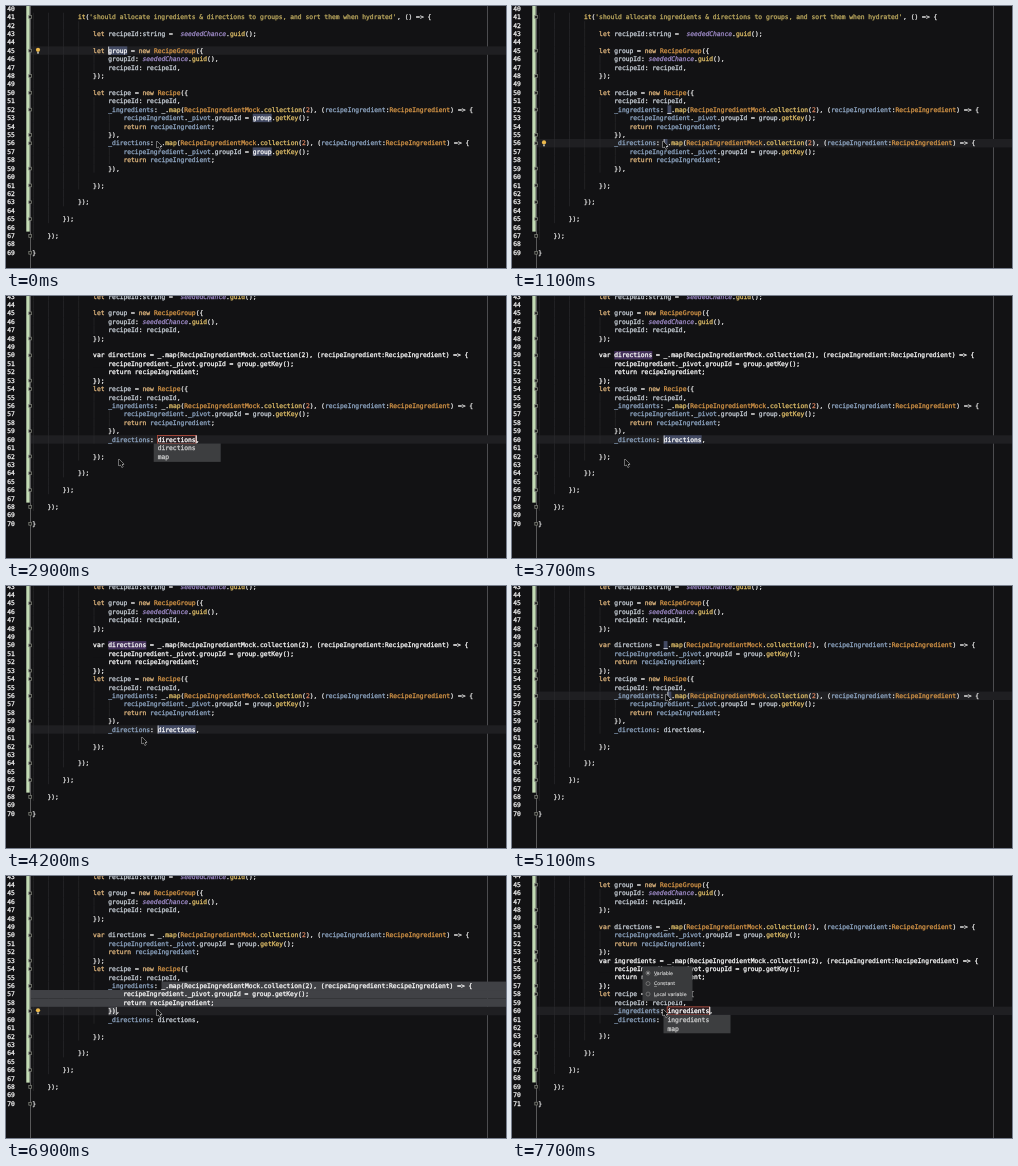
Recreate the animation shown at these times as an HTML page with a canvas. Size 500 px wide and 262 px high, loop 8000 ms.

```html
<!DOCTYPE html>
<html>
<head>
<meta charset="utf-8">
<style>
  html, body { margin: 0; width: 100%; height: 100%; overflow: hidden; background: #121214; }
  canvas { display: block; }
</style>
</head>
<body>
<canvas id="stage" width="500" height="262"></canvas>
<script>
const ctx = document.getElementById('stage').getContext('2d');
const CHAR = 3.8, ROW = 8.42, LEFT = 26.3, FIRST = 41, LOOP = 8000;
const MONO = '6.31px "DejaVu Sans Mono", monospace';
const SANS = '"DejaVu Sans", sans-serif';
const BG = '#121214', SELECTION = '#404145', READ_MARK = '#434a63', WRITE_MARK = '#43305a';

// Code in its three states
const at = (col, text) => ' '.repeat(col) + text;
const mapCall = (col, head, end) => [
  at(col, head + '_.map(RecipeIngredientMock.collection(2), (recipeIngredient:RecipeIngredient) => {'),
  at(col + 4, 'recipeIngredient._pivot.groupId = group.getKey();'),
  at(col + 4, 'return recipeIngredient;'),
  at(col, end)
];
const intro = [
  at(12, "it('should allocate ingredients & directions to groups, and sort them when hydrated', () => {"), '',
  at(16, 'let recipeId:string =  seededChance.guid();'), '',
  at(16, 'let group = new RecipeGroup({'),
  at(20, 'groupId: seededChance.guid(),'),
  at(20, 'recipeId: recipeId,'),
  at(16, '});'), ''
];
const recipe = [at(16, 'let recipe = new Recipe({'), at(20, 'recipeId: recipeId,')];
const outro = ['', at(16, '});'), '', at(12, '});'), '', at(8, '});'), '', at(4, '});'), '', '}'];
const inlineIngredients = mapCall(20, '_ingredients: ', '}),');
const directionsVar = mapCall(16, 'var directions = ', '});');
const directionsUse = at(20, '_directions: directions,');
const docs = [
  { scroll: 0, lines: [...intro, ...recipe, ...inlineIngredients, ...mapCall(20, '_directions: ', '}),'), ...outro] },
  { scroll: 27.4, lines: [...intro, ...directionsVar, ...recipe, ...inlineIngredients, directionsUse, ...outro] },
  { scroll: 36, lines: [...intro, ...directionsVar, ...mapCall(16, 'var ingredients = ', '});'), ...recipe,
    at(20, '_ingredients: ingredients,'), directionsUse, ...outro] }
];

const syntax = [
  [/^'[^']*'/, '#b7a45c'],
  [/^(let|var|new|return)\b/, '#d8b07a'],
  [/^seededChance/, '#9a87c2'],
  [/^[A-Z]\w*/, '#cf9145'],
  [/^\w+(?=\()/, '#d8b865'],
  [/^\d+/, '#c97b5a'],
  [/^(recipeIngredient|_ingredients|_directions|_pivot)\b/, '#8ba2be'],
  [/^\w+/, '#c3cad2'],
  [/^\s+/, BG],
  [/^./, '#dcdcdc']
];

let doc;
const xOf = col => LEFT + col * CHAR;
const yOf = n => 10.9 + (n - FIRST) * ROW - doc.scroll;
const lineAt = n => doc.lines[n - FIRST] || '';

function box(x, y, w, h, fill, stroke) {
  ctx.fillStyle = fill;
  ctx.fillRect(x, y, w, h);
  if (stroke) {
    ctx.strokeStyle = stroke;
    ctx.lineWidth = 0.7;
    ctx.strokeRect(x, y, w, h);
  }
}
// A thin outline gives the text its heavier weight
function write(text, x, y, color, font = MONO, weight = 0.3) {
  ctx.font = font;
  ctx.fillStyle = ctx.strokeStyle = color;
  ctx.lineWidth = weight;
  ctx.fillText(text, x, y + 2.2);
  ctx.strokeText(text, x, y + 2.2);
}
function repaint(n, from, to, bg, fg = '#f6f6f6', x0 = xOf(from), x1 = xOf(to)) {
  box(x0, yOf(n) - ROW / 2, x1 - x0, ROW, bg);
  write(lineAt(n).slice(from, to), xOf(from), yOf(n), fg);
}

function drawLine(text, n) {
  const y = yOf(n);
  const next = doc.lines.slice(n - FIRST).find(s => s) || '';
  for (let c = 0; c < next.search(/\S/); c += 4) box(xOf(c) + 0.6, y - ROW / 2, 0.6, ROW, '#2c2c2f');
  for (let col = 0; col < text.length;) {
    const rest = text.slice(col);
    const [rule, color] = syntax.find(([r]) => r.test(rest));
    const word = rest.match(rule)[0];
    write(word, xOf(col), y, color, (word === 'seededChance' ? 'italic ' : '') + MONO);
    col += word.length;
  }
}

function drawGutter() {
  const last = FIRST + doc.lines.length - 1;
  box(24, 0, 0.8, 262, '#6c6c6c');
  box(20.3, 0, 3.4, yOf(last - 3) + ROW / 2, '#c3dbb5');
  for (let n = FIRST - 1; n <= last; n++) {
    write(n, 1.2, yOf(n), '#f0f0f0');
    if (/[{(]$|^\s*}/.test(lineAt(n))) {
      const y = yOf(n);
      box(22.8, y - 1.3, 2.8, 2.8, '#1c1c1c', '#85887f');
    }
  }
}

function drawBulb(n) {
  const y = yOf(n);
  ctx.fillStyle = '#edb94b';
  ctx.beginPath();
  ctx.arc(32, y - 0.8, 2.1, 0, 7);
  ctx.fill();
  box(31, y + 1.3, 2, 1.8, '#a4a39b');
}

function select(n, col) {
  repaint(n, col, lineAt(n).length, SELECTION, '#f6f6f6', xOf(col), 500);
  for (const k of [n + 1, n + 2]) repaint(k, 0, lineAt(k).length, SELECTION, '#f6f6f6', 25, 500);
  repaint(n + 3, 20, 22, SELECTION);
}

// Freshly inserted code stays white until it is highlighted again
function whiten(from) {
  for (let n = from; n < from + 4; n++) repaint(n, 16, lineAt(n).length, BG);
}

// Rename field, completion list and variable kind chooser
function drawRename(defLine, name, age) {
  const col = lineAt(60).lastIndexOf(name), x = xOf(col), y = yOf(60);
  repaint(60, col, col + name.length, '#2a2024', '#fff');
  ctx.strokeStyle = '#bd5040';
  ctx.lineWidth = 0.8;
  ctx.strokeRect(x - 0.3, y - 4, name.length * CHAR + 0.6, 8);
  box(x + name.length * CHAR, y - 4, 0.9, 8, '#fff');
  box(x - 4, y + 4, 67, 18.4, '#3d3e40');
  write(name, x, y + 8.6, '#c9c9c9');
  write('map', x, y + 17.6, '#c9c9c9');

  ctx.globalAlpha = Math.max(0, Math.min(1, (age - 100) / 300));
  const top = yOf(defLine) + 6;
  box(130.5, top, 50, 34.5, '#393a3c');
  ['Variable', 'Constant', 'Local variable'].forEach((label, i) => {
    const cy = top + 6.7 + i * 10.5;
    ctx.strokeStyle = '#858585';
    ctx.lineWidth = 0.7;
    ctx.beginPath();
    ctx.arc(136, cy, 2, 0, 7);
    ctx.stroke();
    if (!i) box(135.2, cy - 0.8, 1.6, 1.6, '#d0d0d0');
    write(label, 142, cy - 0.4, '#d2d2d2', '4.7px ' + SANS, 0.15);
    box(142, cy + 2.6, 3, 0.4, '#d2d2d2');
  });
  ctx.globalAlpha = 1;
}

function drawLinkHint() {
  repaint(60, 20, 31, BG, '#2944c8');
  box(xOf(20), yOf(60) + 3, 11 * CHAR, 0.7, '#2944c8');
  box(44, 123.2, 131, 10, '#494b4f', '#77797c');
  write("property '_directions' (recipeModel.spec.ts)", 46.5, 128, '#dadada', '5.3px ' + SANS, 0.15);
}

const mousePath = [
  [0, 151, 135], [1100, 151, 135], [1600, 113, 163], [3700, 113, 163], [4200, 136, 151],
  [5000, 154, 108], [5400, 154, 108], [5800, 110, 132], [6000, 110, 132], [6400, 151, 133], [LOOP, 151, 133]
];
const arrow = new Path2D('M0 0V7L1.6 5.6L2.8 8.2L4 7.7L2.9 5.1H5Z');
function drawMouse(t) {
  const i = mousePath.findIndex(p => p[0] > t);
  const [a, b] = [mousePath[i - 1], mousePath[i]];
  const u = (t - a[0]) / (b[0] - a[0]), k = u * u * (3 - 2 * u);
  ctx.save();
  ctx.translate(a[1] + (b[1] - a[1]) * k, a[2] + (b[2] - a[2]) * k);
  ctx.fillStyle = '#111';
  ctx.strokeStyle = '#ddd';
  ctx.lineWidth = 0.9;
  ctx.stroke(arrow);
  ctx.fill(arrow);
  ctx.restore();
}

// Each step: start, document, caret line, caret column, highlighted word
const steps = [
  [0, 0, 45, 20, /\bgroup\b/], [400, 0, 56, 33, /_(?=\.)/], [1500, 0, 59, 22],
  [2800, 1, 60, 43], [3700, 1, 60, 33, /\bdirections\b/], [5000, 1, 56, 34, /_(?=\.)/],
  [6000, 1, 59, 22], [7200, 2, 60, 45]
];
const bulbs = [[0, 400, 45], [900, 1500, 56], [2100, 2800, 59], [5400, 6000, 56], [6900, 7200, 59]];

function draw(t) {
  const [start, index, caretLine, caretCol, word] = steps.filter(s => s[0] <= t).pop();
  doc = docs[index];
  box(0, 0, 500, 262, BG);
  box(481, 0, 0.8, 262, '#5c5c5e');
  box(25, yOf(caretLine) - ROW / 2, 475, ROW, '#1f1f22');
  doc.lines.forEach((text, i) => drawLine(text, i + FIRST));
  if (t >= 2800 && t < 5000) whiten(50);
  if (t >= 7200) whiten(54);
  if (word) doc.lines.forEach((text, i) => {
    const m = i && text.match(word);
    if (m) repaint(i + FIRST, m.index, m.index + m[0].length, /var $/.test(text.slice(0, m.index)) ? WRITE_MARK : READ_MARK);
  });
  if (start === 1500 || start === 6000) select(56, index ? 34 : 33);
  drawGutter();
  box(xOf(caretCol), yOf(caretLine) - 4, 0.8, 8, '#e8e8e8');
  if (start === 2800) drawRename(50, 'directions', t - start);
  if (start === 7200) drawRename(54, 'ingredients', t - start);
  for (const [from, to, n] of bulbs) if (t >= from && t < to) drawBulb(n);
  if (t >= 5800 && t < 6000) drawLinkHint();
  drawMouse(t);
}

const begin = performance.now();
function tick() {
  draw(Math.floor((performance.now() - begin) % LOOP / 100) * 100);
  requestAnimationFrame(tick);
}
tick();
</script>
</body>
</html>
```
